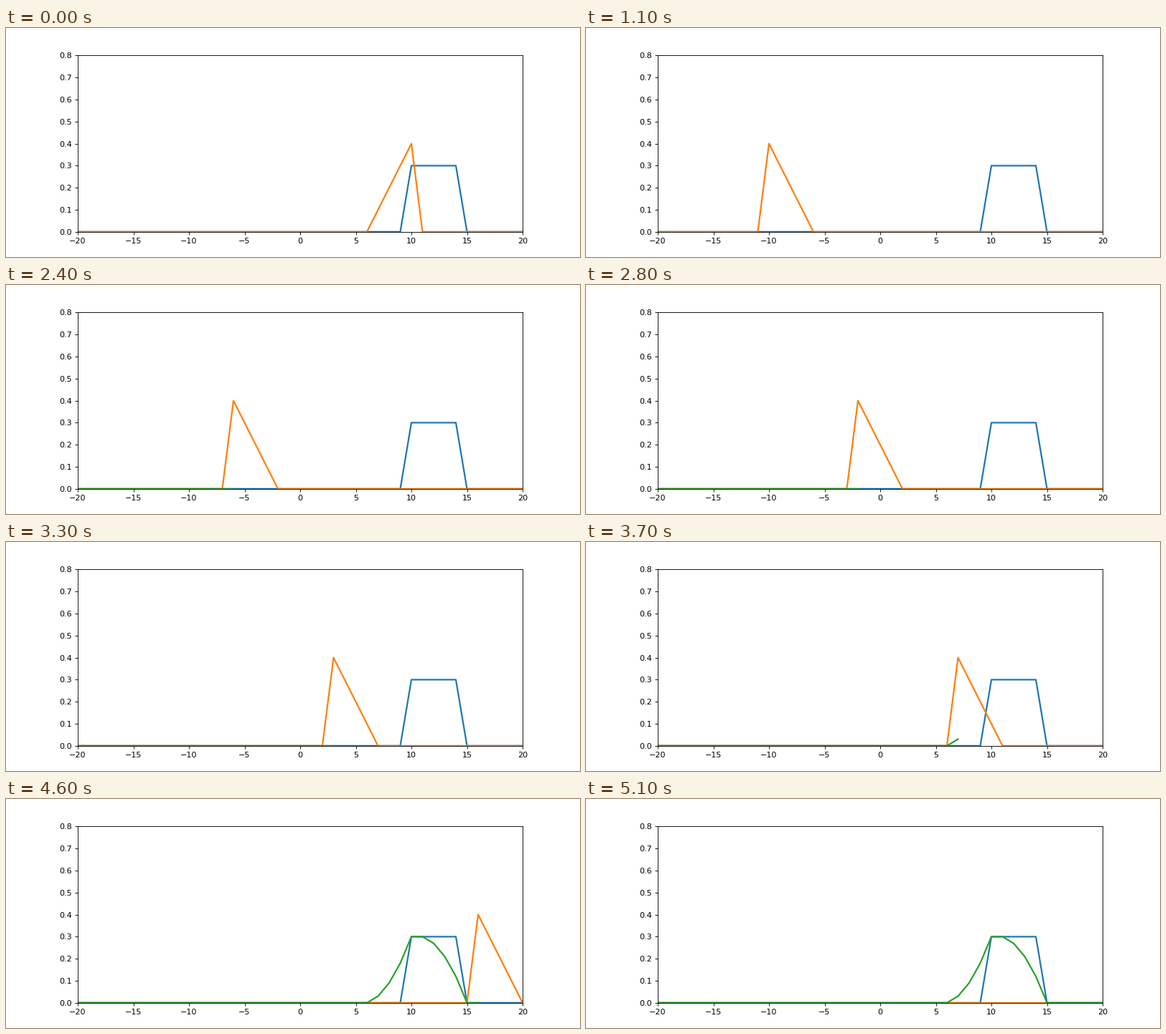
Write a matplotlib script that moves like this. It is 800 px wide and 320 px high and loops after 5.8 s.

```python
import numpy as np
import matplotlib.pyplot as plt
from matplotlib.animation import FuncAnimation

STEP = 100       # ms per frame
FRAMES = 58
FLIP = 11        # frame at which the kernel is mirrored
SLIDE = 21       # frame at which it starts moving right

x = np.arange(-20, 21)
signal = np.where((x >= 10) & (x <= 14), 0.3, 0.0)


def kernel(d):
    """Ramp 0.1 to 0.4 over d = 7..10, zero elsewhere."""
    return np.where((d > 6) & (d <= 10), (d - 6) / 10, 0.0)


def flipped(shift):
    return kernel(shift - x + 10 + 0 * x) if shift is None else kernel(10 - (x - shift))


result = np.array([np.sum(signal * flipped(s)) for s in x])

fig, ax = plt.subplots(figsize=(10, 4), dpi=80)
ax.set_xlim(-20, 20)
ax.set_ylim(0, 0.8)
ax.plot(x, signal, lw=2)
moving, = ax.plot([], [], lw=2)
output, = ax.plot([], [], lw=2)


def update(i):
    if i < FLIP:
        moving.set_data(x, kernel(x))
        output.set_data([], [])
    elif i < SLIDE:
        moving.set_data(x, flipped(-10))
        output.set_data([], [])
    else:
        shift = min(i - SLIDE - 9, 21)
        done = x <= shift
        moving.set_data(x, flipped(shift))
        output.set_data(x[done], result[done])
    return moving, output


anim = FuncAnimation(fig, update, frames=FRAMES, interval=STEP,
                     init_func=lambda: update(0), repeat=True, repeat_delay=0)
plt.show()
```
